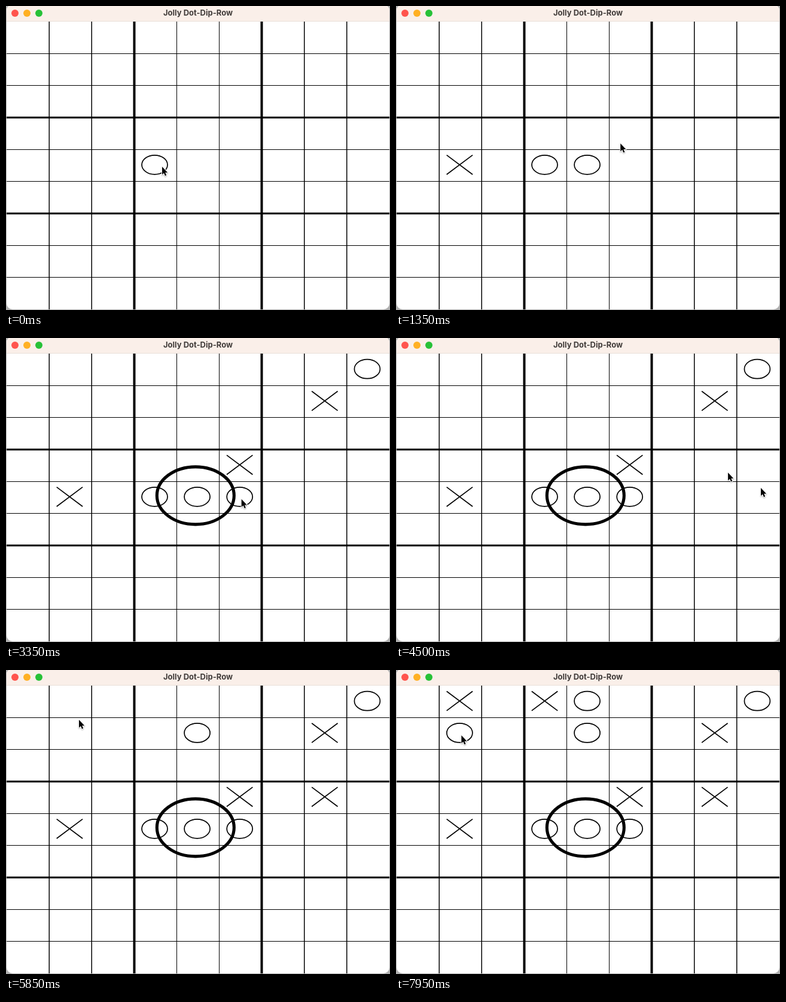
An HTML page with a canvas for the animation above (8000 ms loop, 642 by 507 pixels).

```html
<!DOCTYPE html>
<html lang="en">
<head>
<meta charset="utf-8">
<title>Board game</title>
<style>
  html, body { margin: 0; width: 100%; height: 100%; overflow: hidden; background: #b0b0b0; }
  canvas { display: block; }
</style>
</head>
<body>
<canvas id="stage" width="642" height="507"></canvas>
<script>
const ctx = document.getElementById('stage').getContext('2d');
const W = 642, H = 507, LOOP = 8000, STEP = 50;
const LEFT = 1.15, TOP = 26, CELL_W = 71.08, CELL_H = 53.3;
const LINES = ['012', '345', '678', '036', '147', '258', '048', '246'];

// Cell chosen within each small board, and when it is clicked.
const CELLS = '3442245141104';
const CLICKS = [-100, 700, 1150, 1450, 2350, 2750, 3350, 4600, 5350, 6050, 6700, 7500, 7900];
const ARRIVE = 50, REST = 100;

const PAUSE = { at: 4300, x: 609, y: 248 };
const DETOURS = [
  { at: 0, x: 260, y: 266 }, PAUSE,
  { at: 5850, x: 121, y: 81 }, { at: 7100, x: 330, y: 175 }
];

// Center of a mark; size 1 spans a cell, size 3 a whole small board.
function center(col, row, size) {
  return {
    x: LEFT + (CELL_W * (col + 0.5) - 1.4) * size,
    y: TOP + (CELL_H * (row + 0.5) - 1) * size
  };
}

// Each chosen cell names the next board; a finished board gives way to the first one.
function playGame() {
  const marks = [], taken = Array.from({ length: 9 }, () => []), won = new Set();
  let board = 4;
  CLICKS.forEach((at, i) => {
    const cell = +CELLS[i], player = 'OX'[i % 2], cells = taken[board];
    const col = board % 3 * 3 + cell % 3;
    const row = Math.floor(board / 3) * 3 + Math.floor(cell / 3);
    cells[cell] = player;
    marks.push({ at, player, size: 1, ...center(col, row, 1) });
    if (LINES.some(line => [...line].every(c => cells[c] === player))) {
      won.add(board);
      marks.push({ at, player, size: 3, ...center(board % 3, Math.floor(board / 3), 3) });
    }
    board = won.has(cell) ? 0 : cell;
  });
  return marks;
}

const marks = playGame();
const stops = marks.filter(m => m.size === 1)
  .map(m => ({ at: m.at, x: m.x + 2, y: m.y + 2 }))
  .concat(DETOURS)
  .sort((a, b) => a.at - b.at);

function pointerAt(t) {
  const next = stops.findIndex(s => s.at - ARRIVE > t);
  if (next < 0) return stops.at(-1);
  const a = stops[next - 1], b = stops[next], leave = a.at + REST;
  const u = Math.max(0, (t - leave) / (b.at - ARRIVE - leave));
  const e = u * u * (3 - 2 * u);
  return { x: a.x + (b.x - a.x) * e, y: a.y + (b.y - a.y) * e };
}

function drawMark({ player, size, x, y }) {
  ctx.save();
  ctx.translate(x, y);
  ctx.scale(size, size);
  ctx.strokeStyle = '#000';
  ctx.lineWidth = 1.7;
  ctx.beginPath();
  if (player === 'O') {
    ctx.ellipse(0, 0, 21.5, 16, 0, 0, Math.PI * 2);
  } else {
    for (const s of [-1, 1]) {
      ctx.moveTo(-21.7, -16.2 * s);
      ctx.lineTo(21.7, 16.2 * s);
    }
  }
  ctx.stroke();
  ctx.restore();
}

function drawGrid() {
  ctx.fillStyle = '#000';
  for (let i = 1; i < 9; i++) {
    const thick = i % 3 === 0;
    const w = thick ? 4 : i === 4 || i === 5 ? 1 : 1.5;
    const x = Math.round((LEFT + CELL_W * i - w / 2) * 2) / 2;
    const y = Math.floor(TOP + CELL_H * i);
    ctx.fillRect(x, TOP, w, H);
    ctx.fillRect(0, thick ? y - 0.5 : y, W, thick ? 3 : 1);
  }
}

function drawWindow() {
  ctx.fillStyle = '#b0b0b0';
  ctx.fillRect(0, 0, W, H);
  ctx.save();
  ctx.beginPath();
  ctx.roundRect(1, -1, W - 2, H, [8, 8, 10, 10]);
  ctx.clip();
  ctx.fillStyle = '#fff';
  ctx.fillRect(0, 0, W, H);
  ctx.fillStyle = '#faefe9';
  ctx.fillRect(0, 0, W, TOP);
  ctx.fillStyle = '#e9dfd9';
  ctx.fillRect(0, TOP - 1, W, 1);
  drawGrid();
  ctx.restore();

  ['#ff544d', '#ffb024', '#27c138'].forEach((color, i) => {
    ctx.fillStyle = color;
    ctx.beginPath();
    ctx.arc(15 + 20 * i, 12, 6, 0, Math.PI * 2);
    ctx.fill();
  });
  ctx.fillStyle = '#403b39';
  ctx.font = 'bold 13px Inter, sans-serif';
  ctx.textAlign = 'center';
  ctx.textBaseline = 'middle';
  ctx.fillText('Jolly Dot-Dip-Row', 321, 12.5);
}

const arrow = new Path2D('M1 2V15.2L4 12.5L6 17.2L8.2 16.3L6.2 11.7H10.2Z');

function drawPointer({ x, y }) {
  ctx.save();
  ctx.translate(x, y);
  ctx.shadowColor = 'rgba(0,0,0,.3)';
  ctx.shadowBlur = 2;
  ctx.shadowOffsetY = 1;
  ctx.strokeStyle = '#fff';
  ctx.lineWidth = 2;
  ctx.lineJoin = 'round';
  ctx.stroke(arrow);
  ctx.shadowColor = 'transparent';
  ctx.fillStyle = '#000';
  ctx.fill(arrow);
  ctx.restore();
}

function draw(now) {
  const t = Math.floor((now % LOOP) / STEP) * STEP;
  drawWindow();
  marks.filter(m => t >= m.at).forEach(drawMark);
  // The pointer leaves a brief afterimage where it paused.
  if (t > PAUSE.at && t < PAUSE.at + 300) drawPointer(PAUSE);
  drawPointer(pointerAt(t));
}

let start;
function tick(now) {
  start ??= now;
  draw(Math.max(0, now - start));
  requestAnimationFrame(tick);
}
draw(0);
requestAnimationFrame(tick);
</script>
</body>
</html>
```
